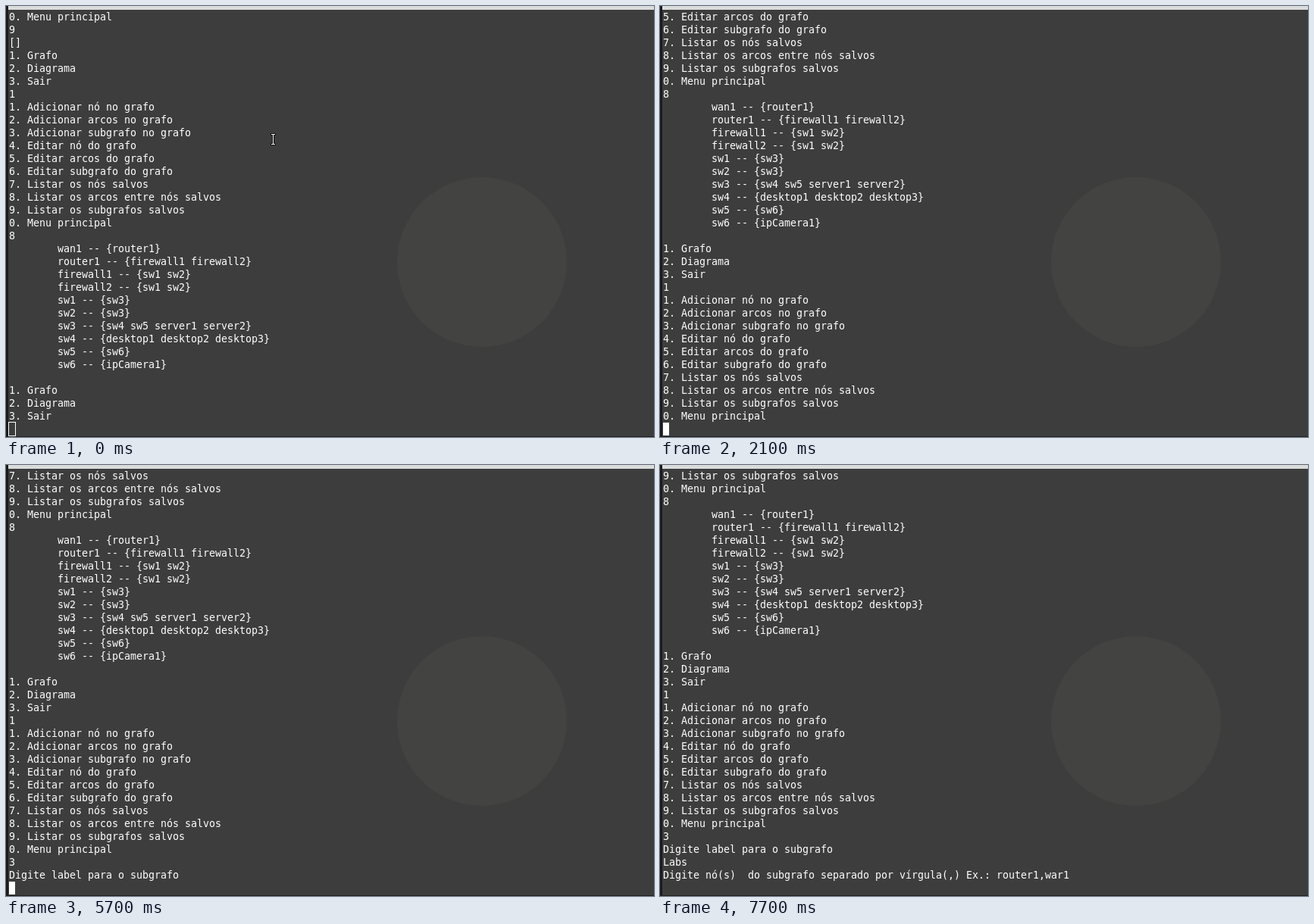
An HTML page with a canvas that plays this animation: 855 px wide and 569 px high, repeating every 8000 ms.

```html
<!DOCTYPE html>
<html lang="pt">
<head>
<meta charset="utf-8">
<style>
html, body { margin: 0; width: 100%; height: 100%; overflow: hidden; background: #3d3d3d; }
canvas { display: block; }
</style>
</head>
<body>
<canvas id="stage" width="855" height="569"></canvas>
<script>
const ctx = document.getElementById('stage').getContext('2d');
const LOOP = 8000, ROWS = 33, CELL = 8, LINE = 17, LEFT = 4, TOP = 6;

const mainMenu = ['1. Grafo', '2. Diagrama', '3. Sair'];
const graphMenu = [
  '1. Adicionar nó no grafo',
  '2. Adicionar arcos no grafo',
  '3. Adicionar subgrafo no grafo',
  '4. Editar nó do grafo',
  '5. Editar arcos do grafo',
  '6. Editar subgrafo do grafo',
  '7. Listar os nós salvos',
  '8. Listar os arcos entre nós salvos',
  '9. Listar os subgrafos salvos',
  '0. Menu principal'
];
const edges = [
  'wan1 -- {router1}',
  'router1 -- {firewall1 firewall2}',
  'firewall1 -- {sw1 sw2}',
  'firewall2 -- {sw1 sw2}',
  'sw1 -- {sw3}',
  'sw2 -- {sw3}',
  'sw3 -- {sw4 sw5 server1 server2}',
  'sw4 -- {desktop1 desktop2 desktop3}',
  'sw5 -- {sw6}',
  'sw6 -- {ipCamera1}'
].map(edge => ' '.repeat(8) + edge);

const history = ['0. Menu principal', '9', '[]', ...mainMenu, '1',
  ...graphMenu, '8', ...edges, '', ...mainMenu];
const afterGraph = [...history, '1', ...graphMenu];
const afterSubgraph = [...afterGraph, '3', 'Digite label para o subgrafo'];
const afterLabel = [...afterSubgraph, 'Labs',
  'Digite nó(s)  do subgrafo separado por vírgula(,) Ex.: router1,war1'];

// Start time, printed lines, typed input, cursor style
const states = [
  [0, history, '', 'hollow'],
  [1300, history, '', 'solid'],
  [1700, history, '1', 'solid'],
  [2100, afterGraph, '', 'solid'],
  [4100, afterGraph, '3', 'off'],
  [4600, afterSubgraph, '', 'solid'],
  [5100, afterSubgraph, '', 'off'],
  [5700, afterSubgraph, '', 'solid'],
  [5900, afterSubgraph, 'L', 'solid'],
  [6400, afterSubgraph, 'Lab', 'solid'],
  [6700, afterSubgraph, 'Labs', 'solid'],
  [7100, afterLabel, '', 'solid'],
  [7700, afterLabel, '', 'off']
];

function rect(color, x, y, w, h) {
  ctx.fillStyle = color;
  ctx.fillRect(x, y, w, h);
}

function drawWindow() {
  rect('#3d3d3d', 0, 0, 855, 569);
  ctx.fillStyle = '#434341';
  ctx.beginPath();
  ctx.arc(628, 338, 112, 0, Math.PI * 2);
  ctx.fill();
  rect('#1b1b1b', 0, 0, 3, 569);
  rect('#202020', 0, 568, 855, 1);
  rect('#d9dcda', 3, 0, 852, 5);
}

function drawLine(text, row) {
  [...text].forEach((char, col) =>
    ctx.fillText(char, LEFT + col * CELL, TOP + row * LINE + 13));
}

function drawCursor(col, style) {
  const x = LEFT + col * CELL, y = TOP + (ROWS - 1) * LINE;
  if (style === 'solid') rect('#fff', x, y, CELL, LINE);
  if (style === 'hollow') {
    ctx.strokeStyle = '#fff';
    ctx.lineWidth = 1;
    ctx.strokeRect(x - 0.5, y - 0.5, CELL + 1, LINE + 1);
  }
}

function drawPointer(time) {
  const step = time < 200 ? 0 : Math.min(9, Math.floor(time / 100) - 1);
  const p = step / 9, ease = p * p * (3 - 2 * p);
  const x = Math.round(352 - 268 * ease), y = Math.round(176 + 378 * ease);
  const beam = (color, grow) => {
    for (const [dx, dy, w, h] of [[-2, -7, 5, 1], [0, -7, 1, 14], [-2, 6, 5, 1]])
      rect(color, x + dx - grow, y + dy - grow, w + 2 * grow, h + 2 * grow);
  };
  beam('#111', 1);
  beam('#fff', 0);
}

function draw(time) {
  const [, lines, input, cursor] = states.filter(state => state[0] <= time).pop();
  drawWindow();
  ctx.font = '13.333px "DejaVu Sans Mono", monospace';
  ctx.fillStyle = '#fff';
  [...lines, input].slice(-ROWS).forEach(drawLine);
  drawCursor(input.length, cursor);
  if (time < 1700) drawPointer(time);
}

const start = performance.now();
function tick() {
  draw((performance.now() - start) % LOOP);
  requestAnimationFrame(tick);
}
tick();
</script>
</body>
</html>
```
